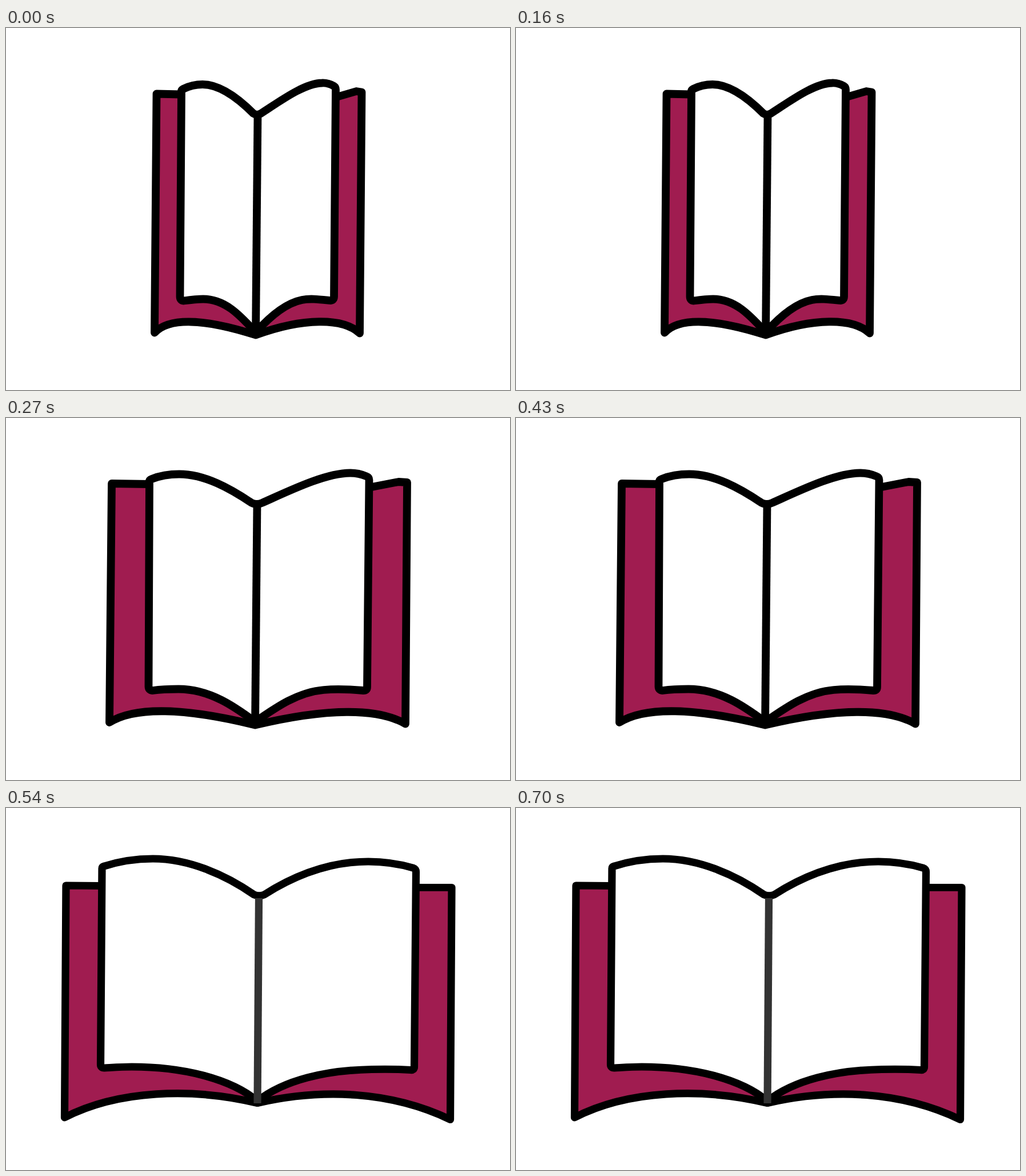
An HTML page for the animation above (810 ms loop, 882 by 635 pixels).

```html
<!DOCTYPE html>
<html lang="en">
<head>
<meta charset="utf-8">
<title>Opening book</title>
<style>
  html, body { margin: 0; width: 100%; height: 100%; overflow: hidden; background: #fff; }
  svg { display: block; width: 882px; height: 635px; }
  path { stroke: #000; stroke-linejoin: round; stroke-linecap: round; }
  .cover { fill: #a01c50; }
  .pages { fill: #fff; }
  .spine { fill: none; stroke-linecap: butt; }
  .soft { stroke: #333; }
  .pose { opacity: 0; stroke-width: 13.8; animation: show 810ms step-end infinite; }
  .half { animation-delay: -540ms; }
  .wide { stroke-width: 13.2; animation-delay: -270ms; }
  @keyframes show {
    0% { opacity: 1; }
    33.3333%, 100% { opacity: 0; }
  }
</style>
</head>
<body>
<svg viewBox="0 0 882 635">
  <g class="pose narrow">
    <path class="cover" d="M260 534.5 L263.5 115.5 L306 116.5 L440 300 L437 538.5 L440 300 L577 121.5 L613 111 L622.5 112.5 L619 535.5 C590 508 520 508 437 538.5 C345 509 285 508 260 534.5 Z"/>
    <path class="pages" d="M307 111 Q307 108.5 310 107 C322 101 333 99 344 99 C374 99 405 122 433 150 Q439 154 446 150 C480 128 522 97 553 96.5 C562 96 569 99 574 102 Q577 104 577 108 L574 471 Q574 478 567 478 C548 476 532 474 518 477 C488 483 460 508 437 534 C412 507 385 475.5 345 475.5 C334 475.5 322 477 311 478.5 Q304.5 478 304.5 471 Z"/>
    <path class="spine" d="M440.5 151 L437 538"/>
  </g>
  <g class="pose half">
    <path class="cover" d="M181 534 L185 115 L250 116 L439 300 L436 538.5 L439 300 L635 122 L687 112 L702 113 L699 536.5 C650 508 560 509 436 538.5 C312 508 225 506 181 534 Z"/>
    <path class="pages" d="M251 111 Q251 108.5 255 107 C270 101 286 98.5 303 98.5 C348 98.5 393 124 430 149 Q439 153 448 149 C495 128 560 96 603 96.5 C614 96.5 623 99 630 102 Q635.5 104 635.5 109 L632 472 Q632 478.5 625 478 C598 475.5 575 475 556 477 C510 481 472 508 436 533 C401 507 357 475.5 302 475.5 C287 475.5 271 476 257 478 Q249.5 478 249.5 471 Z"/>
    <path class="spine" d="M439.5 151 L436 538"/>
  </g>
  <g class="pose wide">
    <path class="cover" d="M102.5 543 L105 136 L165 136.5 L442 300 L440 517.5 L442 300 L718 139.5 L780 139.5 L777.5 546.5 C675 497 555 491 440 517.5 C325 490 195 495 102.5 543 Z"/>
    <path class="pages" d="M168 106 Q168 103 172 102 C200 93 226 89 257 89 C320 89 384 117 434 152 Q443 156 452 152 C510 115 570 94 634 94 C662 94 688 98 712 105 Q717.5 107 717.5 112 L714.5 454 Q714.5 460 708 459.5 C684 458 664 458 640 458.5 C560 460 487 477 440 514 C391 473 305 454 220 454 C204 454 190 455 172 456 Q165.5 456 165.5 450 Z"/>
    <path class="spine soft" d="M442.5 158 L440 518"/>
  </g>
</svg>
</body>
</html>
```
